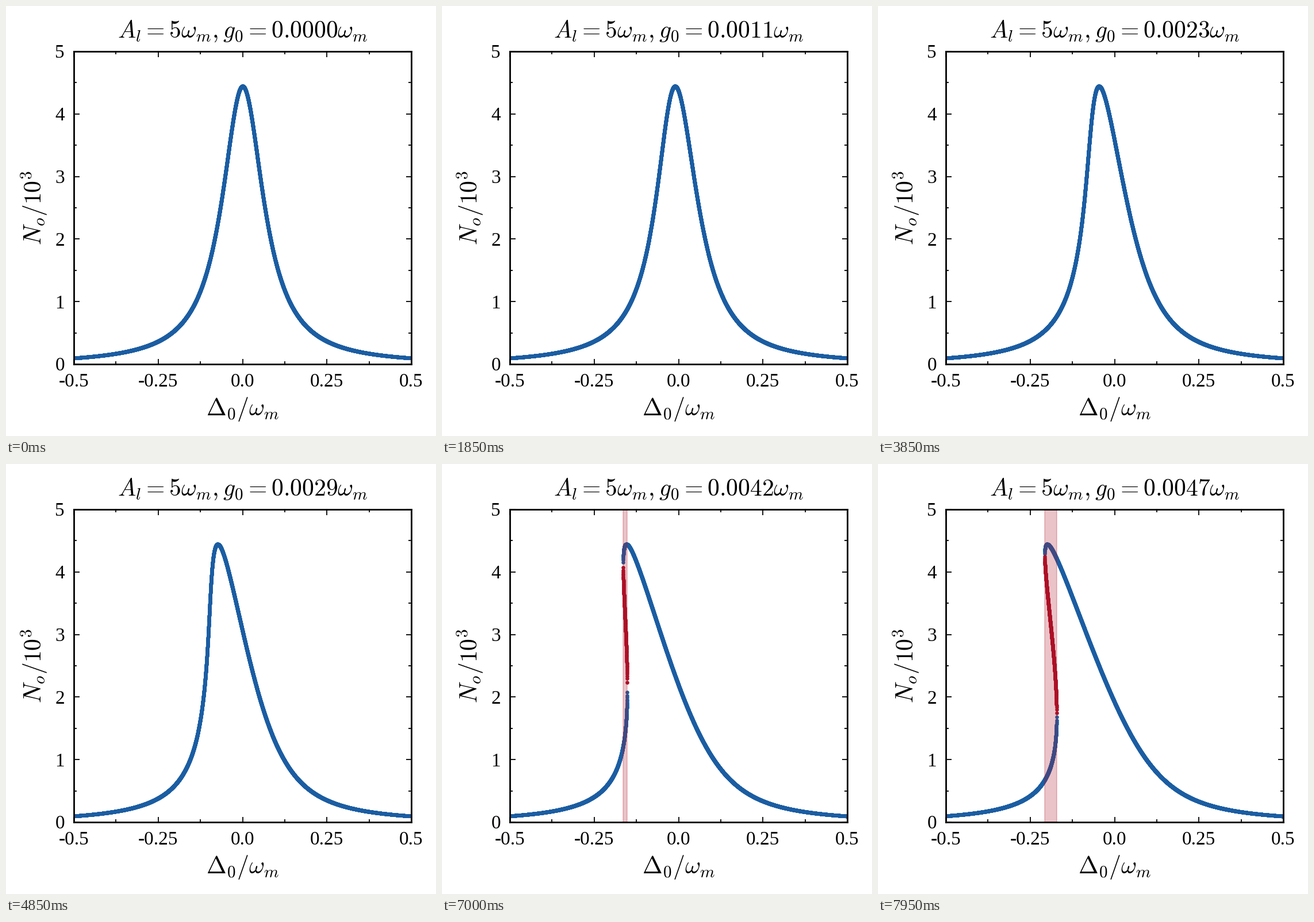
Recreate the animation shown at these times as a matplotlib script. Size 748x748 px, loop 8 s.

```python
import numpy as np
import matplotlib.pyplot as plt
from matplotlib.animation import FuncAnimation
from matplotlib.patches import Rectangle

SIZE, DPI = 748, 176
LEFT, RIGHT, TOP, BOTTOM = 118.05, 704.95, 79.05, 623.05
BLUE, RED = "#1b5da2", "#ac1026"
FRAMES, INTERVAL = 160, 50

DRIVE, HALF_DECAY = 5.0, 0.075      # in units of the mechanical frequency
G_STEP = 3e-5
PEAK = (DRIVE / HALF_DECAY) ** 2

plt.rcParams.update({
    "font.family": "Liberation Serif",
    "mathtext.fontset": "cm",
})


def pt(px):
    return px * 72 / DPI


fig = plt.figure(figsize=(SIZE / DPI, SIZE / DPI), dpi=DPI, facecolor="white")
ax = fig.add_axes([LEFT / SIZE, 1 - BOTTOM / SIZE,
                   (RIGHT - LEFT) / SIZE, (BOTTOM - TOP) / SIZE])
ax.set_xlim(-0.5, 0.5)
ax.set_ylim(0, 5)
ax.set_axisbelow(False)
for spine in ax.spines.values():
    spine.set_linewidth(pt(2.8))

ax.set_xticks(np.linspace(-0.5, 0.5, 5))
ax.set_xticks(np.linspace(-0.375, 0.375, 4), minor=True)
ax.set_yticks(np.arange(6))
ax.set_yticks(np.arange(5) + 0.5, minor=True)
for kind, length in (("major", 9.5), ("minor", 5)):
    ax.tick_params(which=kind, direction="in", top=True, right=True,
                   length=pt(length), width=pt(1.8),
                   labelbottom=False, labelleft=False)


def label(x, y, text, px, ha="center", **kw):
    """Text whose baseline sits at pixel (x, y), measured from the top left."""
    return fig.text(x / SIZE, 1 - y / SIZE, text, fontsize=pt(px), ha=ha,
                    va="baseline", color="black", **kw)


TICK_PX, LABEL_PX = 33.3, 41.67
for i, text in enumerate(["-0.5", "-0.25", "0.0", "0.25", "0.5"]):
    label(LEFT + i * (RIGHT - LEFT) / 4, 662.5, text, TICK_PX)
for i in range(6):
    label(102, BOTTOM - i * (BOTTOM - TOP) / 5 + 11.3, str(i), TICK_PX, "right")

MID_X, MID_Y = (LEFT + RIGHT) / 2, (TOP + BOTTOM) / 2
label(MID_X, 712, r"$\Delta_0/\omega_m$", LABEL_PX)
label(62, MID_Y, r"$N_o/10^3$", LABEL_PX, rotation=90, rotation_mode="anchor")
title = label(MID_X, 54.5, "", LABEL_PX)


def dots(color):
    return ax.plot([], [], "o", color=color, ms=pt(6.6), mew=0)[0]


stable, unstable = dots(BLUE), dots(RED)
band = Rectangle((0, 0), 0, 1, transform=ax.get_xaxis_transform(),
                 facecolor=RED, edgecolor=RED, alpha=0.25,
                 linewidth=pt(1.7), zorder=2.2)
ax.add_patch(band)

detuning = np.linspace(-0.5, 0.5, 10001)
u = np.linspace(-8, 8, 40001)       # effective detuning / HALF_DECAY


def solve(g):
    """Stable and unstable (detuning, photon number) points at coupling g."""
    bare = HALF_DECAY * u - 2 * g**2 * PEAK / (1 + u**2)
    rising = np.diff(bare) > 0
    turns = np.flatnonzero(rising[1:] != rising[:-1]) + 1
    edges = [0, *turns, len(u) - 1]
    out = {True: [], False: []}
    for a, b in zip(edges[:-1], edges[1:]):
        up = bool(rising[a])
        xs, us = bare[a:b + 1], u[a:b + 1]
        if not up:
            xs, us = xs[::-1], us[::-1]
        inside = detuning[(detuning >= xs[0]) & (detuning <= xs[-1])]
        roots = np.interp(inside, xs, us)
        out[up].append((inside, PEAK / (1 + roots**2) / 1000))
    return [np.hstack(out[k]) if out[k] else np.empty((2, 0))
            for k in (True, False)]


def draw(i):
    g = max(i - 1, 0) * G_STEP      # the first state is held twice as long
    good, bad = solve(g)
    stable.set_data(*good)
    unstable.set_data(*bad)
    band.set_visible(bad.shape[1] > 0)
    if bad.shape[1]:
        band.set_x(bad[0].min())
        band.set_width(np.ptp(bad[0]))
    title.set_text(rf"$A_l = 5\omega_m, g_0 = {g:.4f}\omega_m$")
    return stable, unstable, band, title


anim = FuncAnimation(fig, draw, frames=FRAMES, interval=INTERVAL,
                     repeat=True, repeat_delay=0, cache_frame_data=False)
plt.show()
```
